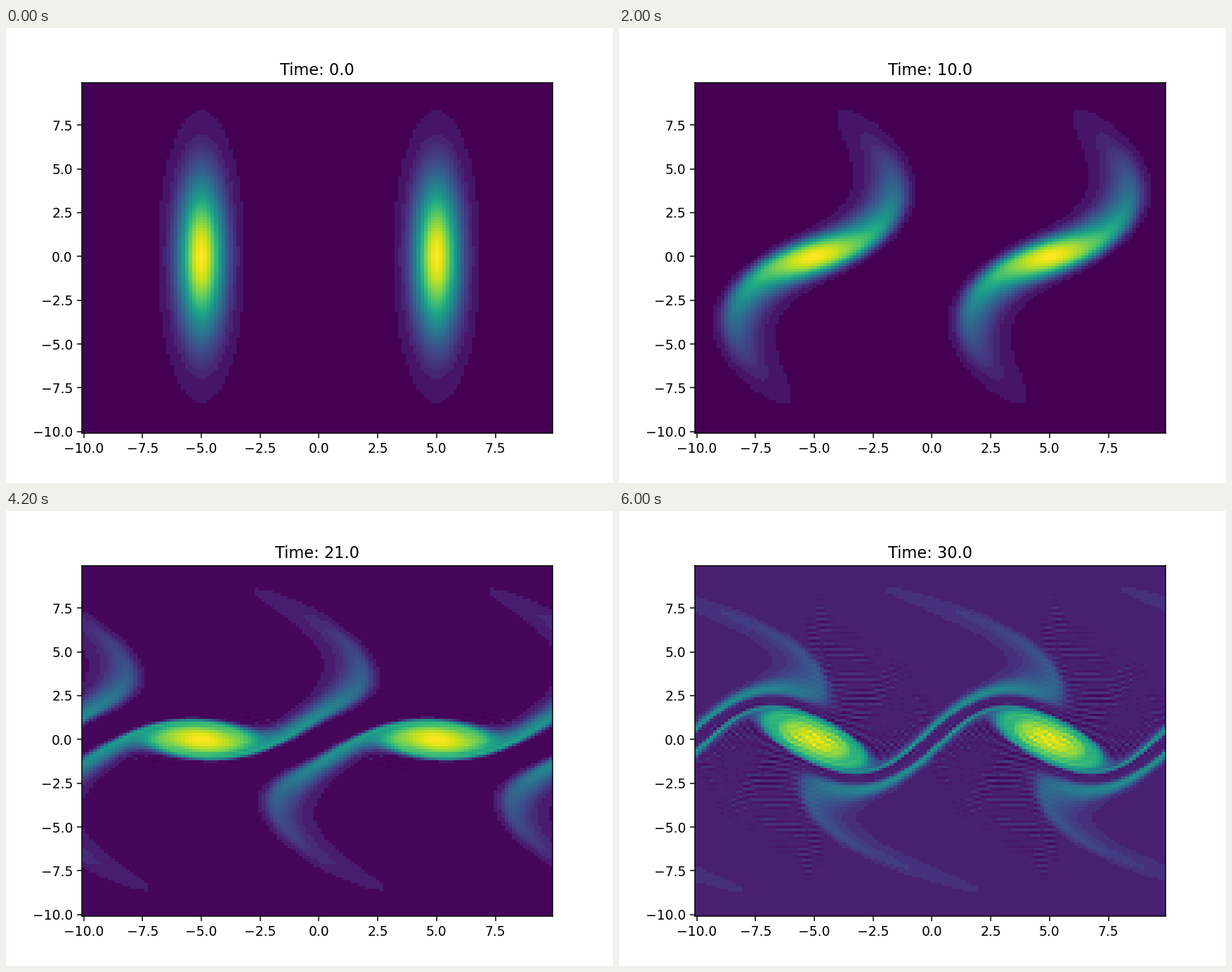
Animation, 864 px wide and 648 px high, one loop 6100 ms. Source, as a matplotlib script:

```python
import numpy as np
import matplotlib.pyplot as plt
from matplotlib.animation import FuncAnimation

N = 128
SIZE = 20.0
FRAMES = 61
FRAME_DT = 0.5
SUBSTEPS = 5

dx = SIZE / N
axis = -SIZE / 2 + dx * np.arange(N)
X, Y = np.meshgrid(axis, axis)

kx = 2 * np.pi * np.fft.rfftfreq(N, dx)[None, :]
ky = 2 * np.pi * np.fft.fftfreq(N, dx)[:, None]
k2 = kx**2 + ky**2
k2[0, 0] = 1.0
inv_k2 = 1 / k2
inv_k2[0, 0] = 0.0
ikx, iky = 1j * kx, 1j * ky
ikx[0, -1] = 0
iky[N // 2, 0] = 0


def real(spec):
    return np.fft.irfft2(spec, s=(N, N))


def rate(spec):
    """Drift of the density in its own periodic potential."""
    phi = spec * inv_k2
    u, v = -real(iky * phi), real(ikx * phi)
    return -np.fft.rfft2(u * real(ikx * spec) + v * real(iky * spec))


def rk4(spec, h):
    a = rate(spec)
    b = rate(spec + h / 2 * a)
    c = rate(spec + h / 2 * b)
    d = rate(spec + h * c)
    return spec + h / 6 * (a + 2 * b + 2 * c + d)


def simulate():
    start = (np.exp(-(X - 5)**2) + np.exp(-(X + 5)**2)) * np.exp(-Y**2 / 20)
    spec = np.fft.rfft2(start)
    states = [start]
    for _ in range(FRAMES - 1):
        for _ in range(SUBSTEPS):
            spec = rk4(spec, FRAME_DT / SUBSTEPS)
        states.append(real(spec))
    return states


def banded(f):
    """Flatten the faintest densities into a few even tones."""
    out = f.copy()
    for low, high, tone in ((-0.012, 0.031, 0.0),
                            (0.031, 0.086, 0.058),
                            (0.086, 0.125, 0.105)):
        out[(f >= low) & (f < high)] = tone
    return out


states = simulate()

fig, ax = plt.subplots(figsize=(6.4, 4.8), dpi=135)
lo, hi = -SIZE / 2 - dx / 2, SIZE / 2 - dx / 2
image = ax.imshow(banded(states[0]), origin="lower", aspect="auto",
                  extent=(lo, hi, lo, hi), interpolation="nearest",
                  cmap="viridis")
title = ax.set_title("Time: 0.0")


def draw(i):
    f = states[i]
    image.set_data(banded(f))
    image.set_clim(f.min(), f.max())
    title.set_text(f"Time: {i * FRAME_DT:.1f}")
    return image, title


anim = FuncAnimation(fig, draw, frames=FRAMES, interval=100,
                     repeat=True, repeat_delay=0)
plt.show()
```
